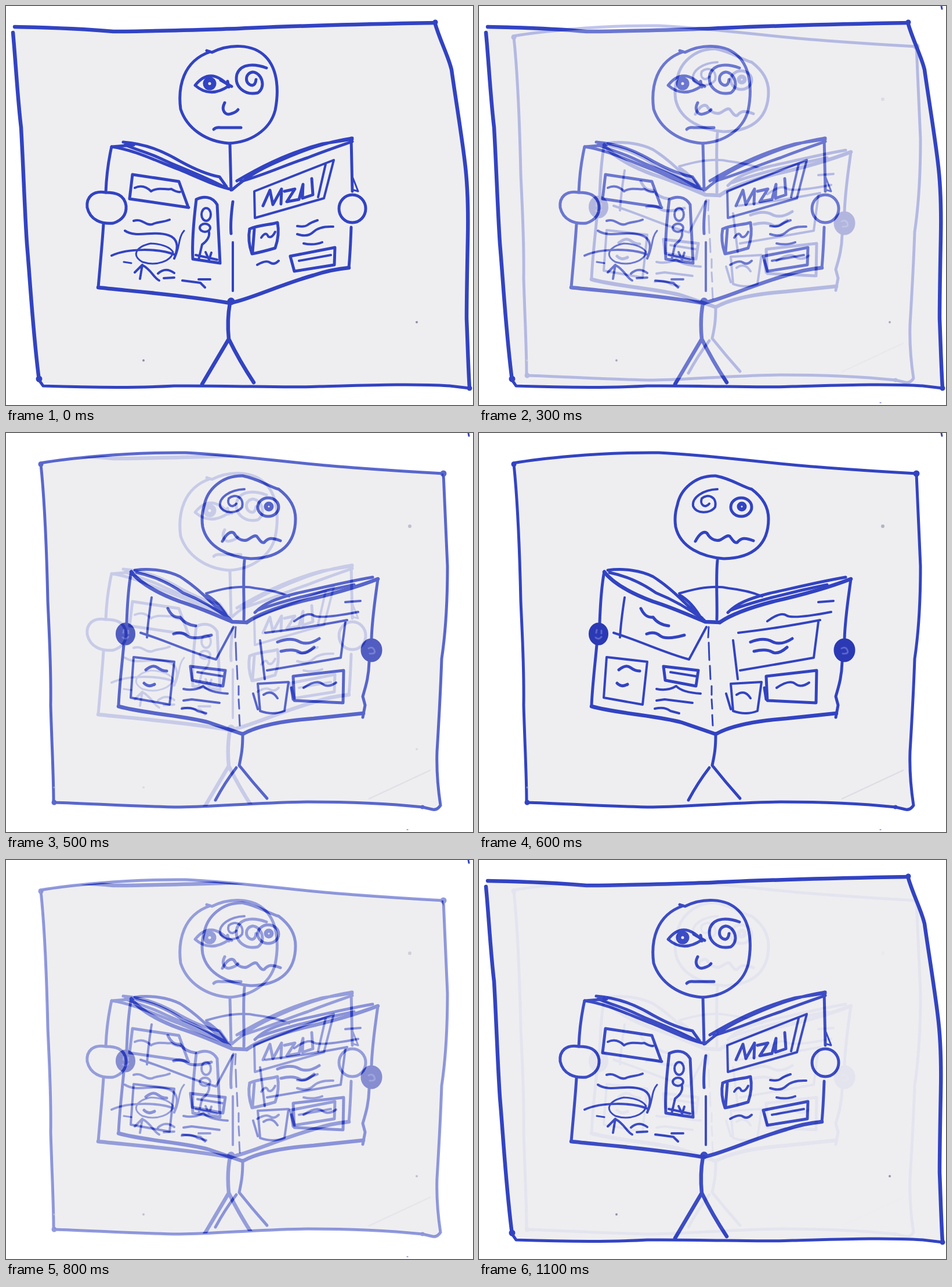
Write an HTML page that moves like this. It is 805x689 px and loops after 1.2 s.

```html
<!DOCTYPE html>
<html lang="en">
<head>
<meta charset="utf-8">
<title>Newspaper reader</title>
<style>
  html, body { margin: 0; width: 100%; height: 100%; overflow: hidden; background: #fff; }
  svg { display: block; width: 805px; height: 689px; }
  .ink { fill: none; stroke: #3243c2; stroke-width: 5; stroke-linecap: round; stroke-linejoin: round; }
  .thin { stroke-width: 4; }
  .fine { stroke-width: 3; }
  .bold { stroke-width: 6.5; }
  .solid { fill: #3243c2; }
  .hand { fill: #2b39b4; stroke: #2b39b4; }
  .paper { fill: #eeeef1; stroke: none; }
  .speck { fill: #8b8da8; stroke: none; }
</style>
</head>
<body>
<svg viewBox="0 0 805 689">
  <defs>
    <path id="sheetA" d="M13 36C60 37 120 38 185 44C240 44 300 42 400 39C520 33 640 31 740 29C748 60 762 85 768 110C775 160 785 220 791 270C796 310 797 350 796 400C795 450 794 500 794 540C796 590 797 630 799 660L765 656C700 652 620 655 540 657C480 660 400 655 290 656C220 660 150 659 57 651C46 560 42 480 36 410C32 350 30 280 26 210C20 160 17 100 12 46Z"/>
    <path id="sheetB" d="M59 52C100 45 200 33 310 34C400 38 500 53 600 60Q680 66 754 70C755 100 757 150 761 230C761 300 757 350 751 390C749 450 746 500 743 550C742 580 744 610 749 643Q743 652 735 650L718 646C660 640 580 637 520 637C430 638 370 645 300 646C220 645 150 640 82 638C82 590 79 540 77 470C78 400 74 340 72 290C70 200 67 120 60 54Z"/>
    <clipPath id="inA"><use href="#sheetA"/></clipPath>
    <clipPath id="inB"><use href="#sheetB"/></clipPath>
  </defs>

  <!-- calm reader -->
  <g id="calm">
    <g class="ink">
      <use href="#sheetA" class="paper"/>
      <!-- border -->
      <path class="bold" d="M15 36C60 37 120 38 185 44C240 44 300 42 400 39C520 33 640 31 740 29"/>
      <path class="bold" d="M739 28C748 60 762 85 768 110C775 160 785 220 791 270C796 310 797 350 796 400C795 450 794 500 794 540C796 590 797 630 799 660"/>
      <path d="M57 646L64 656C150 659 220 660 290 656C400 655 480 660 540 657C620 655 700 652 765 656L799 660"/>
      <path class="bold" d="M12 46C17 100 20 160 26 210C30 280 32 350 36 410C42 480 46 560 57 646"/>
      <g class="solid"><circle cx="740" cy="28" r="2"/><circle cx="57" cy="644" r="3"/><circle cx="799" cy="660" r="2"/></g>
      <!-- head -->
      <path d="M346 77L355 80C385 65 425 65 447 87C470 110 470 150 464 180C455 215 420 236 384 237C345 234 312 212 301 178C296 140 305 95 352 79M386 238L388 318"/>
      <path d="M326 137Q352 104 384 138Q352 160 326 137M370 128L389 139M382 130L384 140"/>
      <circle cx="351" cy="134" r="7" stroke-width="9"/>
      <path d="M449 107C430 100 405 98 398 118C393 140 412 155 434 150C449 140 441 115 425 114C411 116 411 136 425 137Q430 136 431 127"/>
      <path d="M377 167C370 180 378 190 388 186Q396 184 400 179M358 213Q362 209 370 210L405 210"/>
      <!-- newspaper -->
      <path d="M182 243C177 265 173 295 172 322M168 377C166 410 162 450 159 486M595 228L597 320M595 382C594 410 593 430 591 452"/>
      <path class="bold" d="M159 486C200 491 300 498 386 513C420 507 470 482 530 465Q560 455 591 452"/>
      <path d="M182 243C220 248 260 268 300 283C340 300 365 312 390 317M202 235C240 238 270 250 300 268Q340 290 368 295L380 312M205 240C230 250 250 255 270 265S340 293 375 312M183 243L220 240"/>
      <path d="M390 317C410 300 430 285 470 268C510 250 550 235 597 228M398 302C430 283 480 255 545 238L597 230M405 303C450 290 480 275 520 262C550 250 580 240 597 234"/>
      <path d="M391 338C388 360 387 380 388 393"/>
      <path class="thin" d="M391 408L391 492"/>
      <ellipse class="solid" cx="388" cy="510" rx="4" ry="4"/>
      <!-- hands -->
      <path d="M172 322C150 318 138 330 140 348C145 370 165 377 185 375C200 370 208 360 207 345C204 325 188 322 172 322"/>
      <ellipse cx="597" cy="350" rx="23" ry="24"/>
      <path class="fine" d="M598 297L607 320L600 318"/>
      <!-- left page -->
      <path d="M218 291L213 333L315 348M218 291L298 303L314 347"/>
      <path class="thin" d="M222 314C235 308 245 315 250 320C262 312 275 318 285 316Q295 322 300 321"/>
      <path d="M328 334C340 328 355 328 364 343L369 444L322 437Q320 400 328 334"/>
      <g class="thin">
        <ellipse cx="345" cy="360" rx="8" ry="11"/><ellipse cx="343" cy="383" rx="9" ry="7"/>
        <path d="M350 390Q352 402 338 412L332 438M344 425L350 438L354 426M327 430L364 438"/>
        <path d="M220 371C235 366 240 380 252 377C262 372 270 374 282 369"/>
        <path d="M205 388C225 402 260 385 285 398C298 406 296 420 290 436M182 431C210 418 265 418 292 430"/>
      </g>
      <path class="fine" d="M307 388C296 400 300 420 290 436M250 410C225 415 215 430 235 442C260 450 285 440 288 425Q280 412 250 410M203 442L216 444"/>
      <path class="thin" d="M222 460L235 447L231 471M236 448C250 455 255 470 264 474M262 462Q275 450 290 461M272 470L290 469M304 474L335 478L343 486M332 472L352 472"/>
      <!-- right page -->
      <path class="thin" d="M428 320L565 266L548 332L429 366ZM551 273L538 330"/>
      <path d="M443 345L455 318L460 343L475 316L474 342M480 320L498 316L484 338L505 334L512 308L511 332L529 326L527 298"/>
      <path d="M420 385C435 378 455 378 468 374Q472 395 464 418Q440 425 424 428Q416 405 420 385M428 386L425 425"/>
      <path class="thin" d="M440 400Q448 388 452 398Q458 402 464 390"/>
      <path class="thin" d="M502 380Q515 382 520 378T537 370M502 394Q520 400 530 390T564 381M513 410Q530 414 545 408M433 447Q448 438 455 443T470 440"/>
      <path d="M490 432L567 417L566 447L497 458Z"/>
      <path class="thin" d="M505 440L560 430"/>
      <!-- legs -->
      <path class="bold" d="M386 513C382 535 382 555 384 575L338 653M384 575Q402 612 427 650"/>
    </g>
    <circle class="speck" cx="237" cy="612" r="2"/><circle class="speck" cx="708" cy="546" r="2"/>
  </g>

  <!-- dizzy reader -->
  <g id="dizzy">
    <g class="ink">
      <use href="#sheetB" class="paper"/>
      <use href="#sheetB"/>
      <g class="solid"><circle cx="754" cy="70" r="3"/><circle cx="60" cy="54" r="2"/><circle cx="83" cy="638" r="2"/><circle cx="718" cy="646" r="1"/></g>
      <!-- head -->
      <path d="M342 124C347 98 372 73 408 74C435 79 452 92 470 97C490 112 499 130 499 148C499 190 475 216 422 217C385 214 347 198 339 162Q336 143 342 124M411 220C408 250 411 290 410 322"/>
      <path class="thin" d="M411 97C385 98 367 112 369 126C374 140 398 140 407 128C411 110 394 104 384 113C380 124 390 131 397 122"/>
      <ellipse cx="452" cy="128" rx="18" ry="16"/>
      <circle cx="453" cy="127" r="5" stroke-width="7"/>
      <path d="M373 187C379 175 387 168 393 173C398 182 406 187 415 185C422 182 426 176 432 178C437 184 440 191 445 189C452 181 458 180 473 186"/>
      <path class="thin" d="M345 277C375 268 405 262 430 268Q465 272 488 282"/>
      <!-- newspaper -->
      <path d="M216 239C211 265 209 300 208 328M203 366C200 400 195 440 194 472M641 252C636 290 631 320 630 356M626 395C625 425 619 440 615 455L619 470L615 491"/>
      <path class="bold" d="M194 472C240 485 310 488 350 500L408 520C440 502 490 496 530 493L616 484"/>
      <path class="bold" d="M216 240C230 258 260 276 300 291C335 302 365 316 390 326L415 327"/>
      <path d="M222 237C250 233 280 238 300 248C335 270 355 296 385 320M225 241C260 248 285 262 305 276C335 288 360 302 388 323M346 280C360 288 374 304 384 322"/>
      <path class="bold" d="M415 327C435 313 465 302 507 291C560 279 600 268 641 252"/>
      <path d="M429 310C445 294 465 286 500 277C550 266 590 256 632 249M434 306C470 292 540 274 600 262"/>
      <path class="fine" d="M396 335L395 353M396 362L397 392M398 402L399 425M401 437L401 452M401 460L402 476M402 487L403 505"/>
      <!-- hands -->
      <g class="hand"><ellipse cx="206" cy="347" rx="14.5" ry="17"/><ellipse cx="630" cy="375" rx="16" ry="18"/></g>
      <path class="fine" style="stroke:#5a66cc" d="M203 340L202 345M211 341L211 346M201 353Q206 358 211 352M625 372Q632 368 635 375T627 381"/>
      <!-- left page -->
      <path class="thin" d="M251 284C247 310 244 335 243 353M232 345C280 360 320 380 362 391L392 335"/>
      <path d="M279 303C285 316 292 319 300 318Q309 331 327 333M289 347Q302 342 312 350T354 349"/>
      <path class="thin" d="M220 387L290 395L282 469L215 457Z"/>
      <path d="M241 409Q253 399 261 405T277 411M238 432Q246 440 256 434"/>
      <path d="M318 403L378 410L374 437L321 427Z"/>
      <path class="thin" d="M330 413L374 420M306 442Q325 446 340 437Q350 448 382 450M306 462L320 460L368 466M303 476Q320 472 330 480L345 484"/>
      <!-- right page -->
      <path class="thin" d="M438 358L446 425M450 410Q510 400 577 388L585 326M447 345Q510 338 588 323"/>
      <path d="M468 361Q490 352 505 360T540 355M474 377Q495 372 505 378Q515 384 531 370"/>
      <path class="thin" d="M497 325Q520 308 530 315T607 309M585 292L611 290"/>
      <path d="M495 420L582 410L581 466L497 462ZM492 440L495 460"/>
      <path class="thin" d="M513 440Q535 425 545 433T569 431M434 433L487 430L480 480Q460 488 438 480ZM444 452Q458 442 468 458M426 450L434 477"/>
      <!-- legs -->
      <path d="M408 520C408 545 406 555 402 574Q425 603 450 631M397 578Q377 604 361 634"/>
    </g>
    <circle class="speck" cx="696" cy="161" r="3" opacity=".6"/>
    <circle class="speck" cx="83" cy="612" r="1.5"/>
    <path d="M625 632L732 582" stroke="#dcdce3" stroke-width="2"/>
  </g>

  <g id="marks" class="ink fine"><path d="M797 0L798 5"/><path d="M691 685h2" stroke-width="1"/></g>
</svg>
<script>
  const [calm, dizzy, marks] = ["calm", "dizzy", "marks"].map(id => document.getElementById(id));
  const STEP = 100, STEPS = 12;
  const mix = [0, .05, .15, .3, .53, .8, 1];

  function draw(now) {
    const k = Math.floor(now / STEP) % STEPS;
    const b = mix[Math.min(k, STEPS - k)];
    dizzy.style.opacity = b;
    // the weaker drawing is cut off at the edge of the stronger one's sheet
    calm.style.clipPath = b > .5 ? "url(#inB)" : "none";
    dizzy.style.clipPath = b < .2 ? "url(#inA)" : "none";
    marks.style.display = b < .2 ? "none" : "";
    requestAnimationFrame(draw);
  }
  draw(0);
</script>
</body>
</html>
```
